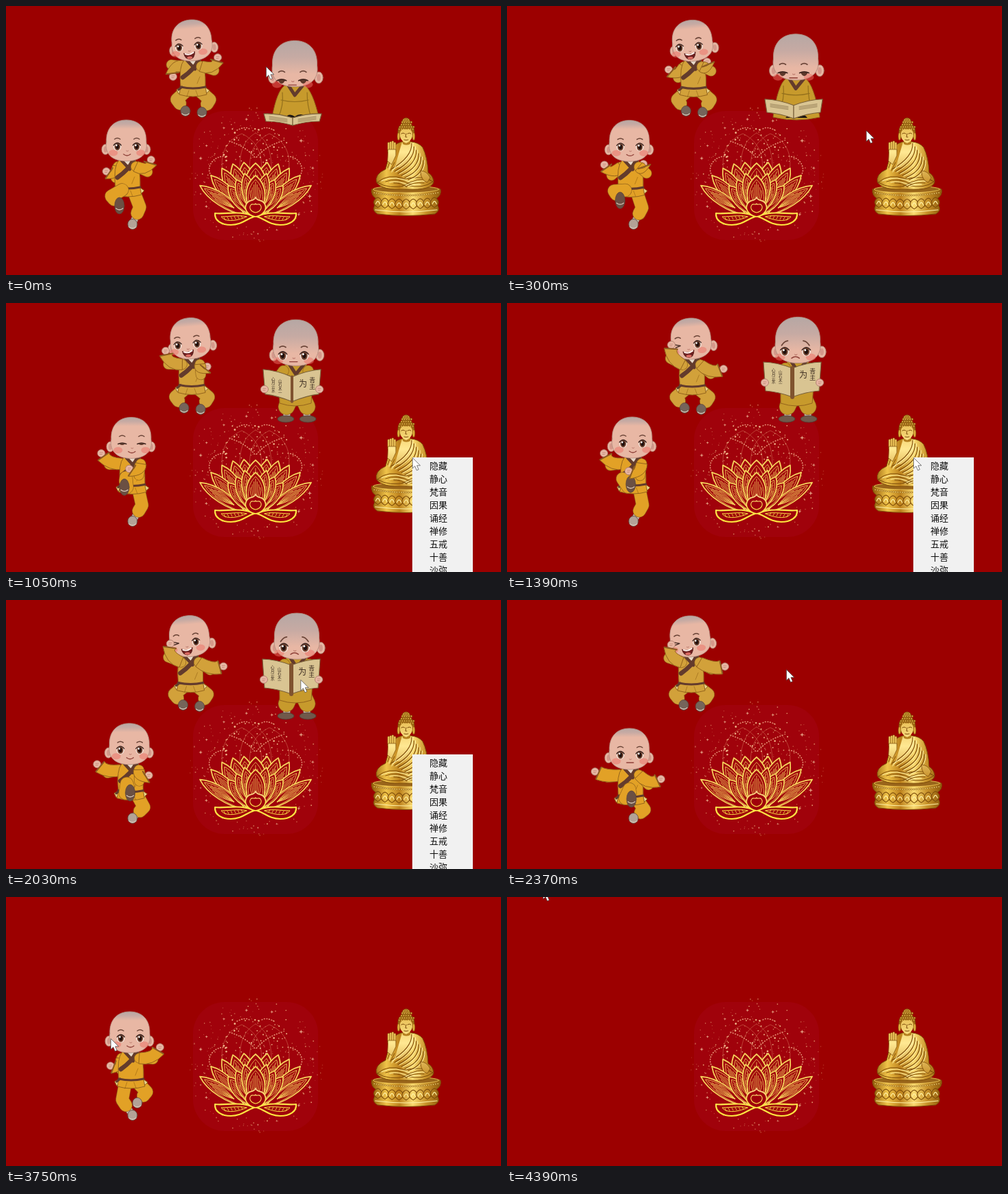
An HTML page with a canvas for the animation above (4640 ms loop, 720x392 px).

```html
<!DOCTYPE html>
<html lang="zh">
<head>
<meta charset="utf-8">
<title>Little monks</title>
<style>
  html, body { margin: 0; width: 100%; height: 100%; overflow: hidden; background: #9c0000; }
  #stage { position: relative; width: 720px; height: 392px; overflow: hidden; }
  canvas { position: absolute; left: 0; top: 0; }
  #menu {
    position: absolute; left: 591px; top: 225px; width: 88px; height: 190px; margin: 0;
    padding: 2px 0 0 25px; box-sizing: border-box; list-style: none; background: #f1f1f1;
    color: #111; font: 13px/19px "Noto Sans CJK SC", "Noto Sans CJK", sans-serif;
  }
  #cursor { position: absolute; left: 0; top: 0; overflow: visible; }
</style>
</head>
<body>
<div id="stage">
  <canvas id="view" width="720" height="392"></canvas>
  <ul id="menu">
    <li>隐藏</li><li>静心</li><li>梵音</li><li>因果</li><li>诵经</li>
    <li>禅修</li><li>五戒</li><li>十善</li><li>沙弥</li>
  </ul>
  <svg id="cursor" width="14" height="21">
    <path d="M.5 .5V16L4 12.7L6.6 18.8L9.4 17.6L6.9 11.8H11.8Z" fill="#fff" stroke="#444" stroke-width=".7"/>
  </svg>
</div>
<script>
const LOOP = 4640;
const STEPS = [0, 300, 470, 690, 1050, 1390, 1730, 2030, 2370, 2730, 3040, 3420, 3750, 4090, 4390];

// dancer: head, both hands, lifted foot; runner: both hands
const KEYS = [
  { t: 0, cursor: [378, 88], dancer: [175, 196, 146, 241, 211, 224, 165, 291], runner: [243, 103, 308, 75] },
  { t: 690, cursor: [590, 225], dancer: [182, 197, 136, 219, 182, 238, 164, 273], runner: [225, 79, 269, 89] },
  { t: 1390, cursor: [591, 225], dancer: [182, 196, 141, 219, 177, 245, 180, 264], runner: [239, 61, 315, 96] },
  { t: 2370, cursor: [406, 101], dancer: [178, 217, 128, 250, 224, 261, 181, 290], runner: [239, 65, 317, 97] },
  { t: 3040, cursor: [249, 81], dancer: [179, 210, 129, 254, 227, 247, 175, 320], runner: [231, 58, 304, 106] },
  { t: 3750, cursor: [152, 206], dancer: [180, 197, 152, 246, 224, 219, 191, 300] },
  { t: 4390, cursor: [52, -13] }
];
const SUPPORT = [184, 318];
const BROWN = '#633b2c', SKIN = '#e8b7a4', SKIN_EDGE = '#a87868', EDGE = '#94641c';
const INK = '#3d241e', PANEL = '#a0020b';
let g;

function layer(canvas) {
  canvas.width = 720; canvas.height = 392;
  g = canvas.getContext('2d');
  g.lineCap = g.lineJoin = 'round';
  return g;
}
function draw(d, fill, stroke, w = 1) {
  const p = new Path2D(d);
  if (fill) { g.fillStyle = fill; g.fill(p); }
  if (stroke) { g.strokeStyle = stroke; g.lineWidth = w; g.stroke(p); }
}
function oval(x, y, rx, ry, fill, stroke, w = .8) {
  g.beginPath();
  g.ellipse(x, y, rx, ry, 0, 0, 7);
  if (fill) { g.fillStyle = fill; g.fill(); }
  if (stroke) { g.strokeStyle = stroke; g.lineWidth = w; g.stroke(); }
}
function ramp(x0, y0, x1, y1, ...cols) {
  const r = g.createLinearGradient(x0, y0, x1, y1);
  cols.forEach((c, i) => r.addColorStop(i / (cols.length - 1), c));
  return r;
}
function rng(seed) {
  return () => (seed = (seed * 16807) % 2147483647) / 2147483647;
}
const mix = (a, b, k) => a.map((v, i) => v + (b[i] - v) * k);
const clamp = v => Math.max(0, Math.min(1, v));
const easeOut = k => 1 - (1 - k) ** 2;
function keyed(name, u, ease = k => k) {
  const i = Math.floor(u), a = KEYS[i][name], b = KEYS[i + 1]?.[name];
  return b ? mix(a, b, ease(u - i)) : a;
}
function bothSides(fn) {
  fn();
  g.save();
  g.translate(726, 0);
  g.scale(-1, 1);
  fn();
  g.restore();
}

/* lotus */
function petal(bx, by, tx, ty, w, ink) {
  const len = Math.hypot(tx - bx, ty - by);
  const leaf = (s, k) => `M0 0C${len * .3} ${-w * k} ${len * .75 * s} ${-w * k} ${len * s} 0` +
    `C${len * .75 * s} ${w * k} ${len * .3} ${w * k} 0 0Z`;
  g.save();
  g.translate(bx, by);
  g.rotate(Math.atan2(ty - by, tx - bx));
  draw(leaf(1, 1), PANEL);
  for (let i = -3; i <= 3; i++)
    draw(`M${len * .25} 0Q${len * .5} ${i * w * .2} ${len * (.84 - Math.abs(i) * .07)} ${i * w * .13}`, 0, ink, .8);
  draw(leaf(.9, .78), 0, ink, .8);
  draw(leaf(1, 1), 0, ink, 1.7);
  g.restore();
}
function sparkle(x, y, r) {
  const q = r / 4;
  draw(`M${x} ${y - r}L${x + q} ${y - q}L${x + r} ${y}L${x + q} ${y + q}L${x} ${y + r}L${x - q} ${y + q}L${x - r} ${y}L${x - q} ${y - q}Z`, '#f8cfa8');
}
function lotus() {
  g.fillStyle = PANEL;
  g.beginPath();
  g.roundRect(272, 153, 182, 188, 46);
  g.fill();
  const rand = rng(77);
  for (let i = 0; i < 300; i++) {
    const a = rand() * 6.283, r = 98 * Math.sqrt(rand()), size = .4 + rand() * .6;
    g.globalAlpha = .3 + rand() * .7;
    oval(363 + Math.cos(a) * r, 246 + Math.sin(a) * r, size, size, '#e8a476');
  }
  for (let i = 0; i < 14; i++) {
    const a = i * .45 + rand() * .4;
    sparkle(363 + Math.cos(a) * 84, 248 + Math.sin(a) * 84, 1.5 + rand() * 2);
  }
  g.globalAlpha = .75;
  bothSides(() => {
    draw('M315 240C311 216 320 196 343 186C364 196 374 215 371 240M340 236C340 208 348 194 363 185', 0, '#d5785a', .7);
    g.setLineDash([.6, 3]);
    draw('M336 181Q348 175 354 179M316 219C296 220 287 245 306 252M325 197Q350 205 363 222', 0, '#ffc39a', 1.6);
    g.setLineDash([]);
  });
  g.globalAlpha = 1;
  for (let i = 0; i < 45; i++) {
    const size = .6 + rand() * .8;
    oval(363 + (rand() - .5) * 95, 178 + rand() * 52, size, size, '#f1b98c');
  }
  const ink = ramp(0, 228, 0, 320, '#f5d45c', '#f6c68c', '#f8cda0', '#fbe04c', '#fce63c');
  bothSides(() => {
    for (let k = 0; k < 5; k++)
      petal(356 - 2 * k, 301 + k, 346 - 16 * k, 228 + 2.1 * k * k, 17 - 1.4 * k, ink);
  });
  petal(363, 304, 363, 229, 22, ink);
  bothSides(() => {
    for (let k = 0; k < 3; k++) petal(358 + k * 2, 304, 323 + k * 12, 262 - k * 9, 13, ink);
  });
  petal(363, 306, 363, 247, 18, ink);
  bothSides(() => {
    draw('M361 307C342 297 321 304 304 302C303 313 314 319 327 319C343 319 350 310 361 307Z', PANEL, ink, 2.2);
    draw('M350 307C338 304 326 307 313 307C318 314 332 315 350 307', 0, ink, 1);
    for (let i = 0; i < 6; i++) draw(`M${319 + i * 5} ${312 - i * .5}l-2 -4`, 0, ink, .8);
    draw('M363 307C352 305 345 296 350 288C354 281 361 285 363 279', PANEL, ink, 1.7);
    draw('M363 301C356 300 353 294 356 290C358 287 362 291 363 288', 0, ink, 1.1);
  });
}

/* statue */
function statue() {
  const dark = '#7d4c0a', lit = '#fff0a6';
  const gold = ramp(534, 0, 630, 0, '#9a640e', '#f0c44a', '#bd811c', '#fbdc72', '#c8922a', '#96600f');
  const bright = ramp(0, 164, 0, 262, '#e2b344', '#ffe892', '#c58c25');
  draw('M532 267Q530 276 539 281L536 291Q532 298 540 303Q582 308 624 303Q632 298 628 291L625 281Q634 276 632 267Q582 255 532 267Z', gold, dark);
  oval(582, 267, 48, 5, '#99651a', '#f4cf5e');
  draw('M538 281Q582 290 626 281M537 297Q582 303 627 297', 0, lit, 1.2);
  for (let i = -4; i <= 4; i++) {
    const x = 582 + i * 10.3, y = 296 - i * i * .15;
    draw(`M${x} ${y}Q${x - 10} ${y - 6} ${x - 3} ${y - 13}Q${x} ${y - 16} ${x + 3} ${y - 13}Q${x + 10} ${y - 6} ${x} ${y}Z`, gold, dark, 1.1);
    draw(`M${x - 3} ${y - 5}Q${x} ${y - 13} ${x + 3} ${y - 5}`, 0, lit, 1.1);
  }
  for (let i = -14; i <= 14; i++) oval(582 + i * 3.3, 276 - i * i * .02, 1.1, 1.2, '#ffe07a', dark, .5);
  draw('M575 198Q561 202 558 216L552 238Q536 245 539 257Q546 269 582 267Q620 269 622 256Q621 247 614 243Q613 220 606 206Q600 199 590 198Z', gold, dark);
  draw('M576 199Q570 218 566 234Q578 240 591 217Q594 206 590 199Z', bright);
  draw('M540 257Q556 243 580 252Q607 246 621 256Q606 267 583 261Q558 268 540 257Z', gold, dark);
  for (let i = 0; i < 6; i++) {
    const x = 590 + i * 3.4, y = 200 + i * 5;
    draw(`M${x} ${y}Q${x + 1} ${y + 20} ${560 + i * 5} ${238 + i * 3}`, 0, dark, 1.1);
    draw(`M${x + 2} ${y}Q${x + 3} ${y + 20} ${562 + i * 5} ${239 + i * 3}`, 0, lit, 1);
  }
  for (let i = 0; i < 4; i++) {
    draw(`M${546 + i * 6} ${255 + i}Q${565 + i * 3} ${245 + i * 4} ${592 - i * 3} ${258 + i * 2}`, 0, i % 2 ? dark : lit);
    draw(`M${618 - i * 5} ${254 + i * 2}Q${600 - i * 4} ${248 + i * 4} ${576 + i * 3} ${263}`, 0, i % 2 ? lit : dark);
    draw(`M${561 + i * 2} ${218 + i * 5}L${555 + i * 2} ${236 + i * 2}`, 0, i % 2 ? lit : dark);
    draw(`M${556.5 + i * 3} 212V${200 - (i % 3)}`, 0, dark, 3.4);
    draw(`M${556.5 + i * 3} 212V${200 - (i % 3)}`, 0, '#f5cd60', 2.3);
  }
  draw('M556 209H567L567 218L561 231L555 226Z', bright, dark, .7);
  draw('M603 240Q612 240 617 250L613 257Q607 256 604 248Z', bright, dark, .8);
  draw('M577 193V201Q582 204 588 201V193Z', '#b5801f');
  oval(582, 169, 6, 6, '#c5912c', dark);
  oval(582, 183, 12, 13, '#a06a14', dark);
  for (let r = 0; r < 5; r++)
    for (let i = -3; i <= 3; i++)
      if (Math.abs(i) < 2 + r * .5) oval(582 + i * 3.3 + (r % 2), 166 + r * 3.4, 1.3, 1.3, '#e8bb4c', dark, .6);
  for (const s of [-1, 1]) oval(582 + s * 11, 190, 1.9, 5.5, '#e0ad3c', dark, .6);
  draw('M573 185Q575 178 582 180Q589 178 591 185Q592 196 582 200Q572 196 573 185Z', bright);
  draw('M575 186Q578 184 580 186M584 186Q587 184 589 186M582 186L581 191H583M579 195Q582 196 585 195', 0, dark, 1);
}

/* monks */
function eye(kind, x, y) {
  if (kind === 'shut') return draw(`M${x - 5} ${y + 1}Q${x} ${y - 6} ${x + 5} ${y + 1}`, 0, INK, 1.5);
  if (kind === 'wink') return draw(`M${x - 4} ${y - 2}L${x + 3} ${y}L${x - 4} ${y + 2}`, 0, INK, 1.3);
  if (kind === 'open') {
    oval(x, y, 5.6, 6, '#f6ebe3');
    oval(x, y, 4.2, 5.4, '#754632');
    oval(x, y, 2.4, 3.4, '#20100d');
    oval(x - 1.4, y - 2, 1.3, 1.4, '#fff');
    return draw(`M${x - 5.5} ${y - 2}Q${x} ${y - 9} ${x + 5.5} ${y - 2}`, 0, INK, 1.3);
  }
  const h = kind === 'half' ? 4 : 9;
  draw(`M${x - 5} ${y - 1}H${x + 5}Q${x} ${y + h} ${x - 5} ${y - 1}Z`, '#5d382a');
  draw(`M${x - 6} ${y}Q${x} ${y - 3} ${x + 6} ${y}`, 0, INK, 1.5);
}
// tilt, face shift and drop, size, scalp depth, eyes, mouth
function head(x, y, { tilt = 0, fx = 0, fy = 0, size = 1, scalp = -17, left = 'open', right = left, mouth = 'smile' }) {
  g.save();
  g.translate(x, y);
  g.rotate(tilt);
  g.scale(size, size);
  for (const s of [-1, 1]) {
    const ex = s * 30 - fx * .4, ey = 13 + fy * .4;
    oval(ex, ey, 5.5, 7.5, SKIN, SKIN_EDGE);
    oval(ex, ey, 2.5, 4.5, '#d4988a');
  }
  draw('M-29 2C-30 -19 -17 -30 0 -30S30 -19 29 2C32 20 20 30 0 30S-32 20 -29 2Z',
    ramp(0, -31, 0, scalp, '#b5a7a4', '#c6aaa3', SKIN), '#b08a7c', .8);
  for (const s of [-1, 1]) {
    const ey = 9 + fy, ex = fx + s * 14, d = mouth === 'sad' ? s * 3 : 0;
    oval(fx + s * 20, 18 + fy * .7, 6.5, 4.5, 'rgba(236,112,100,.5)');
    eye(s < 0 ? left : right, ex, ey);
    draw(`M${ex - 4} ${ey - 11 - d}Q${ex} ${ey - 14} ${ex + 4} ${ey - 11 + d}`, 0, '#6a4437', 1.5);
  }
  const my = 20 + fy * .6;
  draw(`M${fx - 1} ${my - 5}q1.5 1.5 3 0`, 0, '#b9776a');
  if (mouth === 'grin') {
    draw(`M${fx - 8} ${my - 2}Q${fx} ${my + 2} ${fx + 8} ${my - 3}Q${fx + 7} ${my + 7} ${fx} ${my + 7}Q${fx - 7} ${my + 6} ${fx - 8} ${my - 2}Z`, '#6d2020', '#5a201c');
    draw(`M${fx - 6} ${my - 1}Q${fx} ${my + 2} ${fx + 6} ${my - 2}`, 0, '#fff4ee', 2);
    oval(fx, my + 5, 4, 1.8, '#dd6b62');
  } else {
    const k = { smile: 4, flat: 0, sad: -4 }[mouth];
    draw(`M${fx - 5} ${my}Q${fx} ${my + k} ${fx + 5} ${my}`, 0, '#8d3f37', 1.3);
  }
  g.restore();
}
// elbow or knee between two ends; side and drop set where it points
function joint(a, b, len, side, drop) {
  const dx = b[0] - a[0], dy = b[1] - a[1], d = Math.hypot(dx, dy) || 1;
  const h = Math.min(14, Math.sqrt(Math.max(0, len * len - d * d / 4)));
  const k = (-dy * side + dx * drop < 0 ? -h : h) / d, m = mix(a, b, .5);
  return [m[0] - dy * k, m[1] + dx * k];
}
function limb(pts, w, col, edge = EDGE) {
  const d = 'M' + pts.map(p => p.join(' ')).join('L');
  draw(d, 0, edge, w + 1.4);
  draw(d, 0, col, w);
}
function hand(x, y) {
  oval(x, y, 5.6, 5.4, SKIN, SKIN_EDGE);
  draw(`M${x - 2} ${y - 1}h4m-4 2.5h3`, 0, '#bd8473', .8);
}
function arm(shoulder, end, side, robe) {
  const elbow = joint(shoulder, end, 20, side, .8), cuff = mix(elbow, end, .72);
  const normal = (a, b, w) => {
    const d = Math.hypot(b[0] - a[0], b[1] - a[1]) || 1;
    return [(a[1] - b[1]) / d * w, (b[0] - a[0]) / d * w];
  };
  const n = normal(shoulder, elbow, 8), m = normal(elbow, cuff, 10);
  const off = (p, v, k) => `${p[0] + v[0] * k} ${p[1] + v[1] * k}`;
  hand(...end);
  limb([shoulder, elbow], 14, robe);
  draw(`M${off(shoulder, n, 1)}Q${off(elbow, n, 1.3)} ${off(cuff, m, 1)}L${off(cuff, m, -1)}Q${off(elbow, n, -1.3)} ${off(shoulder, n, -1)}Z`, robe, EDGE);
  draw(`M${off(cuff, m, .9)}L${off(cuff, m, -.9)}`, 0, '#8c5b22', 2);
}
function monk(hx, hy, hands, feet, robe, shoes, face, armOver) {
  const nx = hx + 1, ny = hy + 29, bx = hx + 2, by = hy + 68;
  const up = feet.map((f, i) => feet[1 - i][1] - f[1] > 25);
  const leg = i => {
    const s = i * 2 - 1, hip = [bx + s * 8, by + 4], foot = feet[i], knee = joint(hip, foot, 27, s, -.3);
    limb([mix(knee, foot, .3), foot], 9, '#cdbeb2', '#8c7a70');
    limb([hip, knee, mix(knee, foot, .35)], 18, robe);
    oval(foot[0], foot[1], 7, up[i] ? 12 : 7.5, up[i] ? '#6b5043' : shoes, '#5b463c');
    draw(`M${foot[0] - 5} ${foot[1] + 4}q5 4 10 0`, 0, '#d8c8ba', 1.3);
  };
  const sleeve = i => arm([nx + (i * 2 - 1) * 13, ny + 9], hands[i], i * 2 - 1, robe);
  [1, 0].forEach(i => up[i] || leg(i));
  if (!armOver) sleeve(0);
  draw(`M${bx - 17} ${by}l-7 4l3 6l8 -5M${bx + 17} ${by}l7 5l-4 4l-7 -5`, '#ead38a', EDGE);
  draw(`M${nx - 12} ${ny}Q${nx - 20} ${ny + 8} ${bx - 18} ${by}L${bx - 20} ${by + 11}Q${bx} ${by + 17} ${bx + 20} ${by + 11}L${bx + 18} ${by}Q${nx + 20} ${ny + 8} ${nx + 12} ${ny}Z`, robe, EDGE);
  draw(`M${nx - 6} ${ny - 2}L${nx + 1} ${ny + 11}L${nx + 8} ${ny - 2}Z`, '#e6d8c8');
  draw(`M${nx - 8} ${ny}L${nx + 4} ${ny + 13}`, 0, BROWN, 4.5);
  draw(`M${nx + 9} ${ny}Q${nx + 3} ${ny + 13} ${bx - 15} ${by - 14}`, 0, BROWN, 6.5);
  draw(`M${bx - 18} ${by}Q${bx} ${by + 4} ${bx + 18} ${by}m-34 0l-5 4`, 0, BROWN, 3.2);
  draw(`M${bx + 4} ${by + 5}l3 8M${bx - 6} ${by + 5}l-3 9M${bx + 6} ${by - 5}l4 -10`, 0, 'rgba(130,80,10,.45)');
  [1, 0].forEach(i => up[i] && leg(i));
  sleeve(1);
  head(hx, hy, face);
  if (armOver) sleeve(0);
}
function dancer(u) {
  const [hx, hy, lx, ly, rx, ry, fx, fy] = keyed('dancer', u), pose = Math.floor(u);
  const feet = [[fx, fy], SUPPORT];
  if (fx > SUPPORT[0]) feet.reverse();
  monk(hx, hy, [[lx, ly], [rx, ry]], feet, '#e2a126', '#b3a297',
    { fx: 1, left: pose === 1 ? 'half' : 'open', mouth: pose === 3 ? 'flat' : 'smile' }, false);
}
function runner(u) {
  const [lx, ly, rx, ry] = keyed('runner', u), hx = 270 - 1.3 * u;
  const right = u >= 4 ? 'shut' : 'open', left = u >= 2 && u < 4 ? 'wink' : right;
  monk(hx, 50 + u, [[lx, ly], [rx, ry]], [[hx - 9, 153], [hx + 15, 155]], '#d2a13a', '#75645a',
    { tilt: -.09, fx: -5, left, right, mouth: 'grin' }, u >= 1.5);
}
function glyphs(x, y, chars, size) {
  g.fillStyle = '#3c2c20';
  g.font = `${size}px "Noto Sans CJK SC", "Noto Sans CJK", sans-serif`;
  [...chars].forEach((c, i) => g.fillText(c, x, y + i * size * 1.05));
}
function reader(u) {
  const rise = clamp(u), lift = clamp(u - 1), seated = u < .5, robe = '#c79a2c';
  const hx = 420 + 3 * lift, hy = 84 - 22 * rise - 8 * lift - clamp(u - 2) * 2, ny = hy + 32;
  const sx = 417 - 2 * lift, sy = 163 - 42 * rise - 26 * lift;
  const tall = 11 + 19 * rise + 12 * lift, skew = 6 + 7 * rise - 4 * lift;
  const low = seated ? 162 : 146, wide = seated ? 34 : 23;
  if (!seated) for (const s of [-1, 1]) {
    limb([[423 + s * 14, 158], [423 + s * 15, 166]], 9, '#ddd0c6', '#8c7a70');
    oval(423 + s * 16, 169, 12, 5, '#70594b', '#4f3c33');
    limb([[423 + s * 9, 138], [423 + s * 15, 151]], 23, robe);
  }
  draw(`M${hx - 15} ${ny}Q${hx - 26} ${ny + 8} ${421 - wide} ${low}Q421 ${low + 8} ${421 + wide} ${low}Q${hx + 26} ${ny + 8} ${hx + 15} ${ny}Z`, robe, EDGE);
  draw(`M${hx - 9} ${ny}L${hx} ${ny + 14}L${hx + 13} ${ny - 2}`, 0, BROWN, 5);
  if (seated) {
    draw(`M400 ${ny + 21}q20 5 40 0M402 ${ny + 10}q2 20 -6 36M438 ${ny + 10}q0 20 6 36`, 0, '#94701c', 1.2);
    draw('M405 163Q412 155 420 161Q430 154 437 163Z', '#1b1512');
  } else for (const s of [-1, 1]) limb([[hx + s * 18, ny + 9], [sx + s * 32, sy + tall * .5]], 15, robe);
  head(hx, hy, {
    fx: -3, fy: 13 - 3 * rise - 4 * lift, size: 1.12, scalp: 14,
    left: u < 1 ? 'down' : 'open', mouth: u < 2 ? 'flat' : 'sad'
  });
  for (const s of [-1, 1]) {
    const out = sx + s * 42;
    draw(`M${sx} ${sy}Q${sx + s * 22} ${sy - skew * .5 - 4} ${out} ${sy - skew}L${out - s * 3} ${sy + tall - skew}Q${sx + s * 20} ${sy + tall - skew * .5 - 3} ${sx} ${sy + tall}Z`, '#d9c492', '#79603a', 1.1);
    if (seated) for (let i = 1; i < 4; i++)
      draw(`M${sx + s * 8} ${sy + i * 2}l${s * 26} -4`, 0, '#8d7650', .8);
    else hand(out - s * 2, sy + tall * .5);
  }
  if (seated) return;
  draw(`M${sx} ${sy}v${tall}`, 0, '#80532f', 2 + 4 * lift);
  glyphs(sx - 30, sy + 5, '心月云水', 5.5);
  glyphs(sx - 20, sy + 8, '山石木一', 5.5);
  glyphs(sx + 10, sy + 14, '为', 12);
  glyphs(sx + 25, sy + 8, '青主', 9);
}

const backdrop = document.createElement('canvas');
layer(backdrop);
g.fillStyle = '#9c0000';
g.fillRect(0, 0, 720, 392);
lotus();
statue();

const view = layer(document.getElementById('view'));
const menu = document.getElementById('menu'), cursor = document.getElementById('cursor');

function show(ms) {
  const i = KEYS.findLastIndex(k => k.t <= ms), next = KEYS[i + 1];
  const u = i + (next ? (ms - KEYS[i].t) / (next.t - KEYS[i].t) : 0);
  const [x, y] = keyed('cursor', u, easeOut);
  g = view;
  g.drawImage(backdrop, 0, 0);
  if (u <= 5) dancer(u);
  if (u <= 4) runner(u);
  if (u < 3) reader(u);
  menu.style.display = ms >= 1050 && ms < 2370 ? 'block' : 'none';
  cursor.style.transform = `translate(${x}px, ${y}px)`;
}

const start = performance.now();
let shown;
function tick() {
  const t = Math.max(0, performance.now() - start) % LOOP;
  const step = STEPS.findLast(s => s <= t);
  if (step !== shown) show(shown = step);
  requestAnimationFrame(tick);
}
tick();
</script>
</body>
</html>
```
